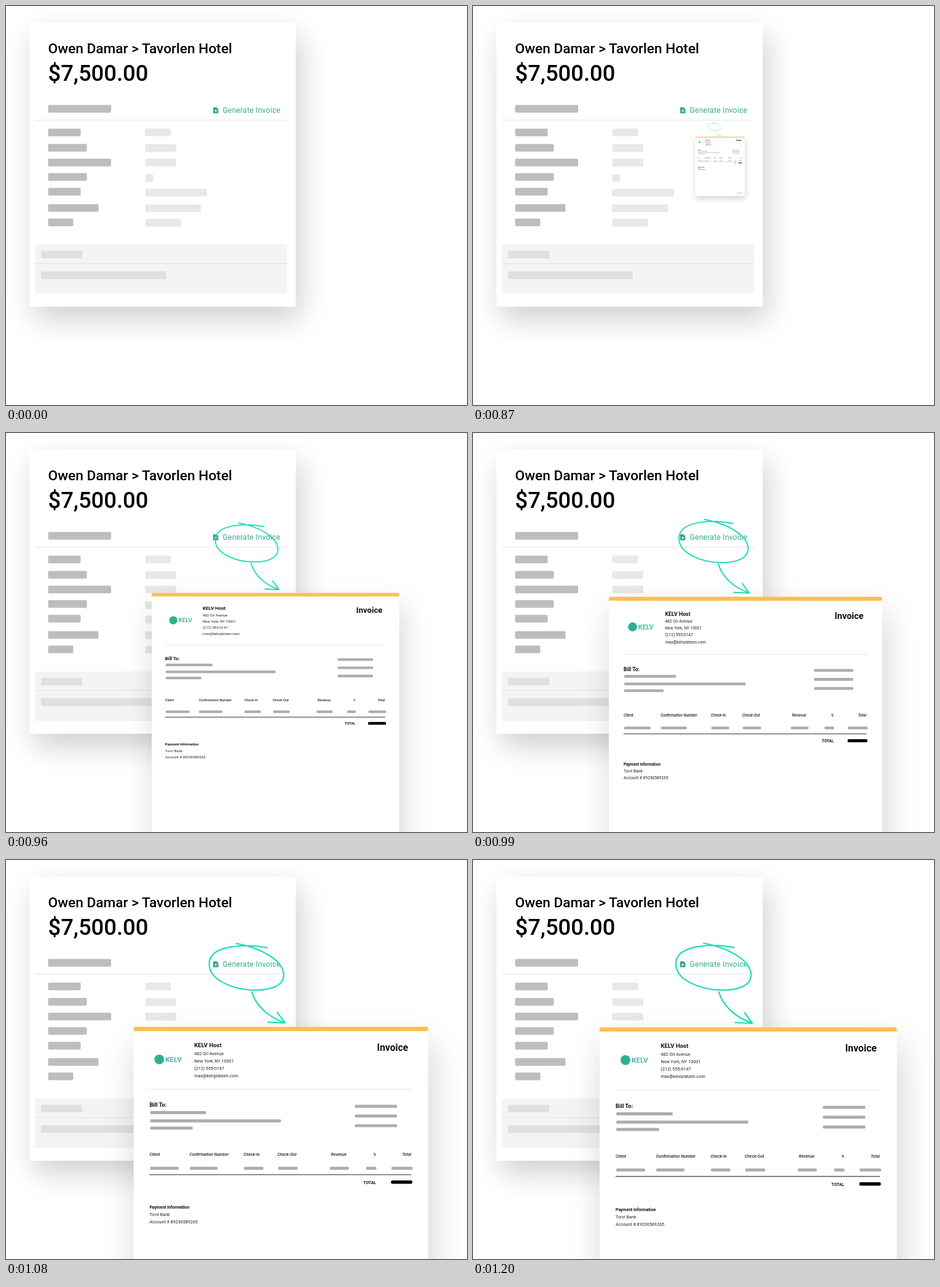
Recreate the animation shown at these times as an HTML page. Size 750 by 650 pixels, loop 4410 ms.

```html
<!DOCTYPE html>
<html lang="en">
<head>
<meta charset="utf-8">
<title>Generate Invoice</title>
<style>
  html, body { margin: 0; width: 100%; height: 100%; overflow: hidden; background: #fff; }
  svg { display: block; width: 750px; height: 650px; font-family: Roboto, sans-serif; }
  .sheet { fill: #fff; }
  .shadow { fill: #000; opacity: .19; filter: blur(24px); }
  .shadow.deep { opacity: .17; filter: blur(30px); }
  .dark { fill: #bdbdbd; }
  .light { fill: #e8e8e8; }
  .mid { fill: #e0e0e0; }
  .grey { fill: #adadad; }
  .rule { stroke: #e2e2e2; }
  .title { font-weight: 500; font-size: 22.7px; }
  .amount { font-weight: 500; font-size: 36.4px; }
  .link { fill: #2fa98c; font-size: 12px; letter-spacing: .3px; }
  .small { font-size: 7.2px; fill: #222; }
  .head { font-size: 6.9px; font-weight: 500; font-style: italic; fill: #222; }
  .bold { font-weight: 700; fill: #111; }
  .ink { fill: none; stroke: #1fdcb9; stroke-width: 2.2; stroke-linecap: round; stroke-linejoin: round; }
  #popup { transform-origin: 392.5px 201px; transform: scale(0); }
</style>
</head>
<body>
<svg viewBox="0 0 750 650">
  <g id="card">
    <rect class="shadow" x="46" y="47" width="433" height="463"/>
    <rect class="sheet" x="38" y="27" width="433.5" height="463" rx="3"/>
    <text class="title" x="68.5" y="77">Owen Damar &gt; Tavorlen Hotel</text>
    <text class="amount" x="68.5" y="122">$7,500.00</text>
    <path fill="#2fa98c" d="M338 165h4.5l3 3v5.7a1 1 0 0 1-1 1h-6.500a1 1 0 0 1-1-1v-7.700a1 1 0 0 1 1-1z"/>
    <path stroke="#fff" d="M341.200 168.500v4.400M339 170.700h4.400"/>
    <text class="link" x="352.500" y="174">Generate Invoice</text>
    <path class="rule" d="M47 186H458"/>
    <rect fill="#f4f4f4" x="47" y="388.500" width="410.500" height="80.500" rx="3"/>
    <path class="rule" d="M47 419.500H457.500"/>
  </g>
  <g id="popup">
    <rect class="shadow deep" x="212" y="300" width="483.500" height="577"/>
    <rect class="sheet" x="206" y="272.500" width="483.500" height="577.500" rx="4"/>
    <path fill="#fbbf52" d="M206 279.500v-4a3 3 0 0 1 3-3h477.500a3 3 0 0 1 3 3v4z"/>
    <circle cx="248" cy="326" r="8" fill="#2db191"/>
    <text x="258" y="330" font-size="11.800" font-weight="500" fill="#2db191">KELV</text>
    <text class="bold" x="305.500" y="306" font-size="9.600">KELV Host</text>
    <text class="bold" x="605.500" y="312" font-size="15.800">Invoice</text>
    <path class="rule" d="M232 375H663"/>
    <text class="bold" x="232" y="404" font-size="9.400">Bill To:</text>
    <path stroke="#555" stroke-width="1.300" d="M232 515.500H662"/>
    <text class="bold" x="583" y="530.500" font-size="6.900">TOTAL</text>
    <text class="bold" x="232" y="571.500" font-size="6.900">Payment Information</text>
    <path class="ink" d="M425 142.500C390 136 330 137 330 169C330 196 370 212 407 212C437 212 453 202 452.500 186C450 162 415 143 375 135.500"/>
    <path class="ink" d="M400 214.500C405 235 425 256 454 265.500M442 249L454.500 266L427 265"/>
  </g>
</svg>
<script>
  const card = document.getElementById('card');
  const popup = document.getElementById('popup');

  function add(parent, tag, attrs, content = '') {
    const node = document.createElementNS('http://www.w3.org/2000/svg', tag);
    for (const name in attrs) node.setAttribute(name, attrs[name]);
    node.textContent = content;
    const ink = parent.querySelector('.ink');
    parent.insertBefore(node, ink);
  }
  const bar = (parent, cls, x, midY, width, height) =>
    add(parent, 'rect', { class: cls, x, y: midY - height / 2, width, height, rx: 2 });
  const label = (cls, x, y, content) => add(popup, 'text', { class: cls, x, y }, content);

  // Left middle, left width, right middle, right width
  [[206, 53, 206, 42], [231, 63, 231.5, 50.5], [255, 102.5, 255, 50.5], [278.5, 63, 280.5, 13],
   [302.5, 53, 304, 100.5], [329, 82, 329.5, 90.5], [352.5, 41, 353, 58.5]]
    .forEach(([leftY, leftW, rightY, rightW]) => {
      bar(card, 'dark', 68.5, leftY, leftW, 12.5);
      bar(card, 'light', 226.5, rightY, rightW, 12.5);
    });
  bar(card, 'dark', 68.5, 167.5, 102.5, 12.5);
  bar(card, 'mid', 57, 405, 67, 12.5);
  bar(card, 'mid', 57, 438.5, 203, 12.5);

  ['482 Orl Avenue', 'New York, NY 10001', '(212) 555-0147', 'max@kelvplatzen.com']
    .forEach((line, i) => label('small', 305.5, 318.7 + i * 12.1, line));
  [[413.5, 92], [427, 215], [439, 70]].forEach(([y, w]) => bar(popup, 'grey', 233, y, w, 5));
  [403, 419, 435].forEach(y => bar(popup, 'grey', 569, y, 69.5, 5));

  // Label, its x, bar x, bar width
  [['Client', 232, 233, 47], ['Confirmation Number', 297.5, 298, 46], ['Check-In', 386.5, 387, 32],
   ['Check-Out', 442, 443, 32.5], ['Revenue', 530, 528, 31.5], ['%', 599, 587.5, 17],
   ['Total', 647, 629, 35]]
    .forEach(([name, x, barX, width]) => {
      label('head', x, 484.7, name);
      bar(popup, 'grey', barX, 505, width, 5);
    });
  bar(popup, 'total', 628.5, 527.7, 35, 5.5);
  label('small', 232, 583.7, 'Torvi Bank');
  label('small', 232, 595.7, 'Account # 89236589265');
  label('small', 614, 823, 'Powered by Kelv');

  // The popup grows in 30 ms steps with an exponential ease in and out.
  const LOOP = 4410, START = 750, STEP = 30, STEPS = 16;
  const easeInOutExpo = p =>
    p >= 1 ? 1 : p < .5 ? 2 ** (20 * p - 10) / 2 : 1 - 2 ** (10 - 20 * p) / 2;
  const pose = (scale, offset) => ({ transform: `scale(${scale})`, offset, easing: 'step-end' });

  const frames = [pose(0, 0)];
  for (let i = 0; i < STEPS; i++) {
    frames.push(pose(easeInOutExpo((i + 4) / 19), (START + i * STEP - .5) / LOOP));
  }
  frames.push(pose(1, 1));
  popup.animate(frames, { duration: LOOP, iterations: Infinity });
</script>
</body>
</html>
```
